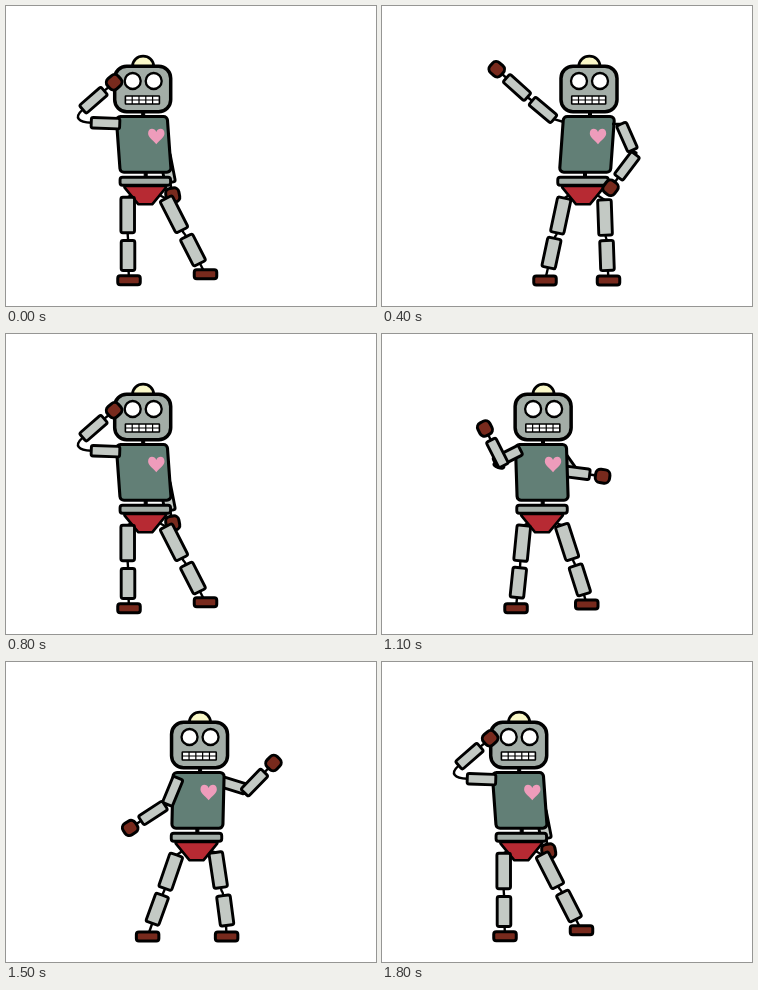
Animation of 370x300 px, one loop 2 s. Source, as an HTML page with a canvas:

```html
<!DOCTYPE html>
<html lang="en">
<head>
<meta charset="utf-8">
<title>Dancing robot</title>
<style>
  html, body { margin: 0; width: 100%; height: 100%; overflow: hidden; background: #fff; }
  canvas { display: block; width: 370px; height: 300px; }
</style>
</head>
<body>
<canvas id="stage" width="370" height="300"></canvas>
<script>
const ctx = document.getElementById('stage').getContext('2d');
const LIMB = '#c3c9c4', STEEL = '#a3ada7', CHEST = '#627f76', RUST = '#782a1d',
      RED = '#b72a33', CREAM = '#faf8c8', PINK = '#ee9cbb';

// body: x of head, chest top, chest bottom, hips, heart
// limbs: upper x, y, angle, lower x, y, angle (legs add foot x, y)
// layers (left arm, right arm): 0 behind legs, 1 behind chest, 2 in front
const salute = {
  body: [136.7, 135.7, 139.7, 139.3, 150.3],
  armL: [99.5, 117.2, 182, 87.5, 94.2, -41],
  armR: [155, 133, 85, 161.5, 162.5, 79],
  legL: [121.7, 209, 90, 122, 249.5, 90, 123, 274.3],
  legR: [168, 208.3, 63, 187, 244, 63, 199.5, 268.3],
  layers: [2, 0]
};
const point = {
  body: [205, 205.5, 202, 200.3, 214.5],
  armL: [160, 104, 220, 134, 81.5, -138],
  armR: [240, 132, 102, 234, 165, 103],
  legL: [178.7, 209.5, 102, 169.5, 247, 102, 163, 274.5],
  legR: [223, 211.5, 88, 225, 249.5, 88, 226.5, 274.5],
  layers: [1, 2]
};
const strut = {
  ...point,
  body: [207, 207, 203, 201, 216],
  armL: [161, 104, 220, 135, 81.5, -138],
  armR: [245, 131, 66, 245, 160, 127]
};
const swing = {
  body: [180.6, 183.3, 183, 182.5, 195.8],
  armL: [159, 126.5, 125, 127, 137.5, -168.5],
  armR: [216, 126, 37, 244, 146.7, 33.5],
  legL: [155, 210, 112, 139.5, 247.5, 113, 128.7, 274.5],
  legR: [207.5, 208.5, 74, 220.5, 247.5, 75, 226.7, 274.5],
  layers: [2, 1]
};
const mirror = {
  body: [206.5, 202, 199.7, 198.5, 209.5],
  armL: [174.5, 132, 100, 167, 164.5, -258],
  armR: [236.5, 120, -2, 253, 94.5, -125.4],
  legL: [174.5, 209.5, 106, 163, 247, 107, 154.5, 274.5],
  legR: [217, 207.5, 89, 218, 249.5, 90, 214.5, 274.5],
  layers: [1, 2]
};

function blend(a, b, t) {
  const out = { layers: (t < 0.5 ? a : b).layers };
  for (const key of ['body', 'armL', 'armR', 'legL', 'legR'])
    out[key] = a[key].map((v, i) => v + (b[key][i] - v) * t);
  return out;
}

// the pointing arm swings up through a high arc
const lift = blend(salute, point, 0.5);
lift.armL[1] -= 5;
lift.armL[4] -= 10;

const back = blend(swing, salute, 0.5);
const LOOP = 2000;
const steps = [
  [0, salute], [100, lift], [200, point], [300, blend(point, strut, 0.6)], [400, strut],
  [600, swing], [700, back], [800, salute],
  [1100, blend(salute, mirror, 0.35)], [1200, blend(salute, mirror, 0.7)], [1300, mirror],
  [1500, blend(mirror, swing, 0.5)], [1600, swing], [1700, back], [1800, salute]
];

function paint(fill, width) {
  if (fill) {
    ctx.fillStyle = fill;
    ctx.fill();
  }
  ctx.lineWidth = width;
  ctx.stroke();
}

function poly(pts, r, fill, width) {
  const n = pts.length, last = pts[n - 1];
  ctx.beginPath();
  ctx.moveTo((last[0] + pts[0][0]) / 2, (last[1] + pts[0][1]) / 2);
  pts.forEach((p, i) => ctx.arcTo(...p, ...pts[(i + 1) % n], r));
  ctx.closePath();
  paint(fill, width);
}

function box(x, y, w, h, r, fill, width, angle = 0) {
  ctx.save();
  ctx.translate(x, y);
  ctx.rotate(angle * Math.PI / 180);
  w /= 2;
  h /= 2;
  poly([[-w, -h], [w, -h], [w, h], [-w, h]], r, fill, width);
  ctx.restore();
}

function along(x, y, angle, d) {
  const a = angle * Math.PI / 180;
  return [x + Math.cos(a) * d, y + Math.sin(a) * d];
}

function wire(from, to) {
  ctx.beginPath();
  ctx.moveTo(...from);
  ctx.lineTo(...to);
  paint(null, 2.4);
}

// two segments joined by a bent wire
function limb([ux, uy, ua, lx, ly, la], root, len1, len2, thick) {
  const p = along(ux, uy, ua, len1 / 2), q = along(lx, ly, la, -len2 / 2);
  const k = Math.hypot(p[0] - q[0], p[1] - q[1]) * 0.8;
  wire(root, along(ux, uy, ua, -len1 / 2));
  ctx.beginPath();
  ctx.moveTo(...p);
  ctx.bezierCurveTo(...along(...p, ua, k), ...along(...q, la, -k), ...q);
  paint(null, 2.4);
  box(ux, uy, len1, thick, 2, LIMB, 2.9, ua);
  box(lx, ly, len2, thick, 2, LIMB, 2.9, la);
}

function arm(a, root) {
  const [, , , x, y, angle] = a, [hx, hy] = along(x, y, angle, 27.3);
  wire([x, y], [hx, hy]);
  limb(a, root, 28.5, 28.5, 10.6);
  box(hx, hy, 14.4, 13.4, 5, RUST, 3, angle);
}

function leg(l, root) {
  const [, , , x, y, , fx, fy] = l;
  wire([x, y], [fx, fy]);
  limb(l, root, 35.5, 30, 13.6);
  box(fx, fy, 22.5, 9, 2.5, RUST, 3);
}

function head(x) {
  ctx.beginPath();
  ctx.ellipse(x + 0.4, 60, 10.5, 9.8, 0, Math.PI, 0);
  paint(CREAM, 2.8);
  box(x, 83, 56, 45.5, 12, STEEL, 3.5);
  for (const side of [-10.5, 10.5]) {
    ctx.beginPath();
    ctx.arc(x + 0.5 + side, 75, 8, 0, 7);
    paint('#fff', 2.3);
  }
  box(x - 0.3, 94, 34, 8, 0.5, '#fff', 1.6);
  ctx.beginPath();
  ctx.moveTo(x - 17, 94);
  ctx.lineTo(x + 17, 94);
  for (let i = 1; i < 5; i++) {
    const tx = x - 17.3 + i * 34 / 5;
    ctx.moveTo(tx, 90);
    ctx.lineTo(tx, 98);
  }
  paint(null, 1.2);
}

function heart(x) {
  ctx.beginPath();
  ctx.moveTo(x, 138.3);
  ctx.bezierCurveTo(x - 4, 133.5, x - 8.2, 131.5, x - 8.2, 127.3);
  ctx.bezierCurveTo(x - 8.2, 121.5, x - 1.5, 121.5, x, 126);
  ctx.bezierCurveTo(x + 1.5, 121.5, x + 8.2, 121.5, x + 8.2, 127.3);
  ctx.bezierCurveTo(x + 8.2, 131.5, x + 4, 133.5, x, 138.3);
  ctx.fillStyle = PINK;
  ctx.fill();
}

function draw(pose) {
  const [hx, top, bot, hip, love] = pose.body;
  const arms = layer => {
    if (pose.layers[0] === layer) arm(pose.armL, [top - 22, 117]);
    if (pose.layers[1] === layer) arm(pose.armR, [top + 23, 118]);
  };
  ctx.fillStyle = '#fff';
  ctx.fillRect(0, 0, 370, 300);
  ctx.strokeStyle = '#000';
  ctx.lineJoin = 'round';

  arms(0);
  poly([[hip - 22, 180], [hip + 22, 180], [hip + 7, 198.3], [hip - 7, 198.3]], 1, RED, 2.6);
  leg(pose.legL, [hip - 14, 189]);
  leg(pose.legR, [hip + 14, 189]);
  arms(1);
  box((hx + top) / 2 + 1, 108, 3, 8, 0, '#000', 1);
  box(bot, 169, 3, 8, 0, '#000', 1);
  box(hip, 175.2, 50.5, 8, 2.5, STEEL, 2.9);
  poly([[top - 25.5, 110.5], [top + 25.5, 110.5], [bot + 25.5, 166.2], [bot - 25.5, 166.2]], 4, CHEST, 3.1);
  heart(love);
  head(hx);
  arms(2);
}

let shown = null;
function tick(now) {
  const t = now % LOOP;
  const pose = steps.filter(s => s[0] <= t).pop()[1];
  if (pose !== shown) draw(shown = pose);
  requestAnimationFrame(() => tick(performance.now() - start));
}
const start = performance.now();
tick(0);
</script>
</body>
</html>
```
